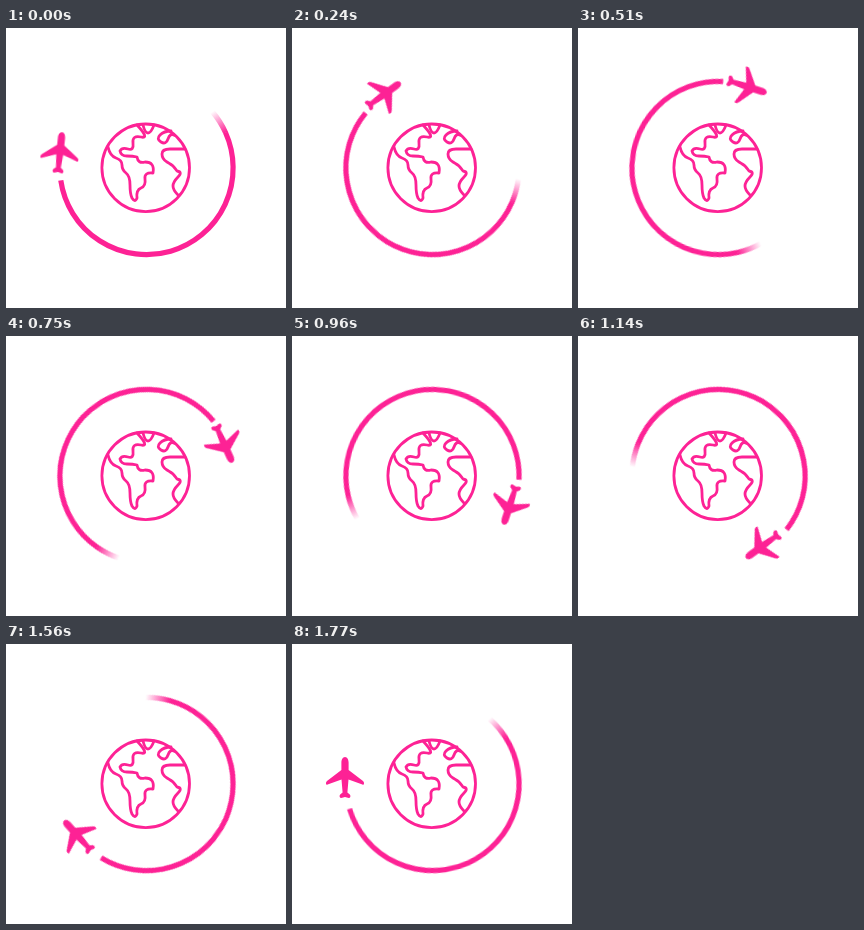
Write an HTML page that moves like this. It is 280 px wide and 280 px high and loops after 1800 ms.

```html
<!DOCTYPE html>
<html lang="en">
<head>
<meta charset="utf-8">
<title>Plane around the globe</title>
<style>
  html, body { margin: 0; width: 100%; height: 100%; overflow: hidden; background: #fff; }
  svg { display: block; width: 100vw; height: 100vh; color: #fd2295; }
  #trail, #plane { transform-box: view-box; }
  #trail { transform-origin: 140.5px 140px; }
  #plane { transform-origin: 138.25px 138.25px; }
</style>
</head>
<body>
<svg viewBox="0 0 280 280">
  <defs>
    <linearGradient id="fade" gradientUnits="userSpaceOnUse">
      <stop offset="0" stop-color="currentColor" stop-opacity="0"/>
      <stop offset="1" stop-color="currentColor"/>
    </linearGradient>
    <path id="half" d="M0 0C2.3 0 3.6 2.8 3.6 5.5V13L18 24Q19.3 25.2 19 27Q18.7 28.2 17.4 27.6L3.5 22.6L2.4 35.4L4.8 37.4Q5.6 38.2 5.4 39.6Q5.2 41.2 3.8 41L0 40Z"/>
  </defs>
  <g fill="none" stroke="currentColor" stroke-width="2.8" stroke-linecap="round" stroke-linejoin="round">
    <circle cx="139.7" cy="139.8" r="43.8"/>
    <!-- Americas -->
    <path d="M102 119Q104 128 110 130T116 137T120 145T124 157T126 170Q129 175 131 170Q130 162 135 160T139 151T147 145Q149 134 139 134Q132 136 131 129Q127 128 121 128T114 123Q116 119 122 121T127 115T135 109T131 97"/>
    <!-- Greenland, Europe, Africa -->
    <path d="M137 97Q139 105 142 105T148 97"/>
    <path d="M165 103Q158 103 154 107T155 114T162 111T168 107"/>
    <path d="M179 121H164Q156 121 156 126T161 134T167 138T171 143Q177 144 172 149T167 158T172 167"/>
  </g>
  <g id="trail" fill="none" stroke-width="5.2">
    <path id="body" stroke="currentColor"/>
    <path id="wisp" stroke="url(#fade)"/>
  </g>
  <g id="plane" fill="currentColor">
    <use href="#half" transform="translate(53 113)"/>
    <use href="#half" transform="translate(53 113) scale(-1 1)"/>
  </g>
</svg>
<script>
const LOOP = 1800, STEPS = 60, R = 86.6;
const HEAD = 171.8, SOLID = -24, TAIL = -40.5; // trail angles in degrees
const $ = id => document.getElementById(id);

function orbit(deg) {
  const a = deg * Math.PI / 180;
  return [140.5 + R * Math.cos(a), 140 + R * Math.sin(a)];
}

function arc(id, from, to) {
  const large = to - from > 180 ? 1 : 0;
  $(id).setAttribute('d', `M${orbit(from)}A${R} ${R} 0 ${large} 1 ${orbit(to)}`);
}

function spin(id, from, to) {
  $(id).animate(
    [{ transform: `rotate(${from}deg)` }, { transform: `rotate(${to}deg)` }],
    { duration: LOOP, iterations: Infinity, easing: `steps(${STEPS})` }
  );
}

arc('body', SOLID - 0.2, HEAD); // small overlap hides the seam
arc('wisp', TAIL, SOLID);
[TAIL, SOLID].forEach((deg, i) => {
  const [x, y] = orbit(deg);
  $('fade').setAttribute('x' + (i + 1), x);
  $('fade').setAttribute('y' + (i + 1), y);
});

spin('plane', 6, 366);
spin('trail', 0, 357.5); // the trail lags slightly behind the plane
</script>
</body>
</html>
```
